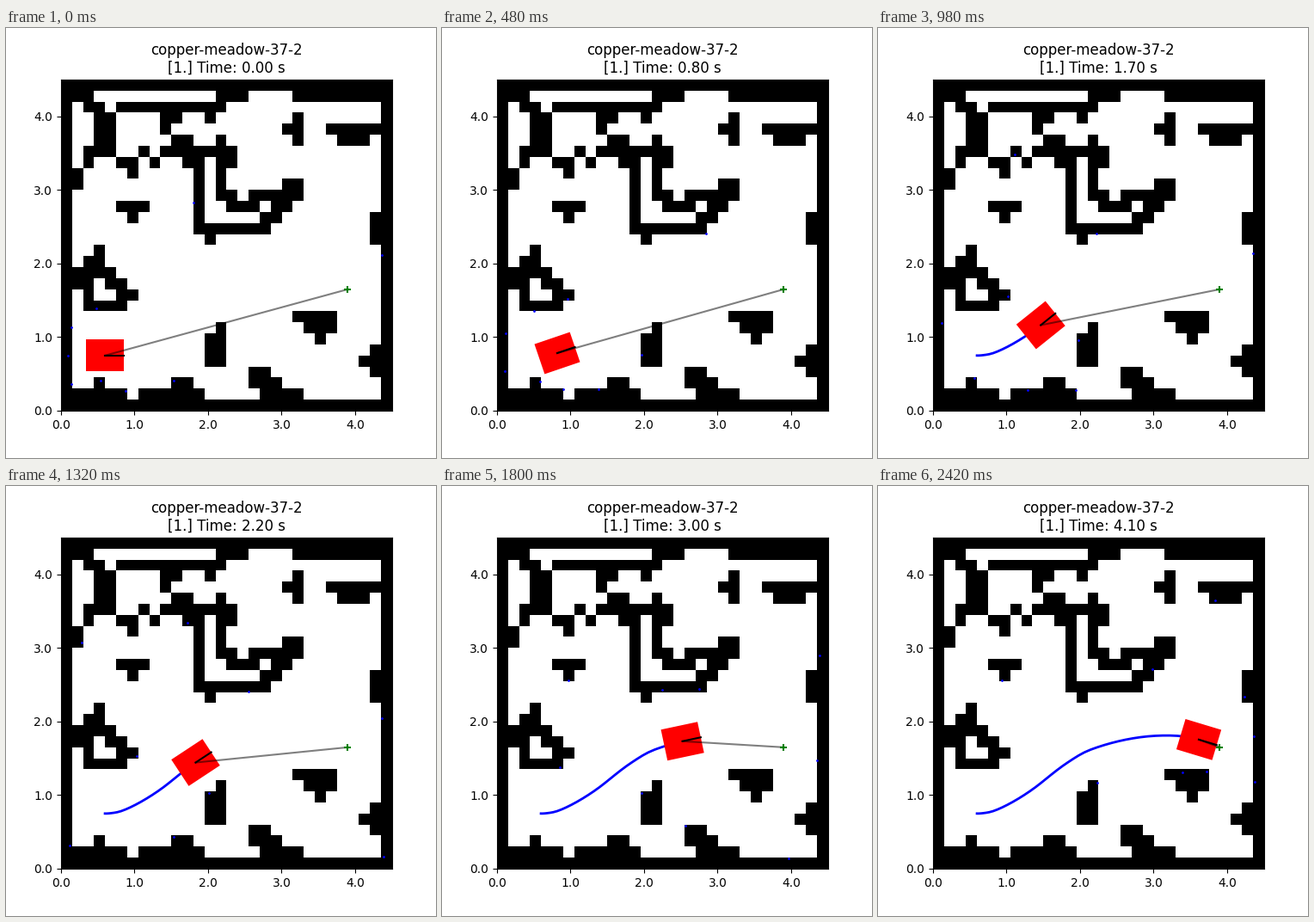
Animation of 500 by 500 pixels, one loop 2.44 s. Source, as a matplotlib script:

```python
import numpy as np
import matplotlib.pyplot as plt
from matplotlib.animation import FuncAnimation
from matplotlib.patches import Polygon

CELLS, CELL = 30, 0.15
SIZE = CELLS * CELL
LENGTH, WIDTH = 0.508, 0.430
GOAL = np.array([3.9, 1.65])
DT, STEPS = 0.1, 42
BEAMS = np.radians(np.arange(-180, 180, 40))
RAY_STEP = 0.05

# Walls: first cell (column, row from the top), then a walk over the cells.
WALLS = [
    (1, 1, "R1 D1 R1 D4 L1 D1"), (4, 3, "D3"), (16, 1, "L2 D1 L9"),
    (13, 3, ""), (10, 3, "L1 D1"), (21, 1, "R8"), (20, 4, "R1 U1 D2"),
    (24, 4, "R4 L1 D1 L2"),
    (10, 5, "R1 D2 R1 D6 R6 U1 R1 U1 R1 U2 R1 D1 L4 D1 L2 U1 L1 U5"),
    (9, 6, "R6 D1"), (13, 14, ""), (7, 6, ""), (8, 7, ""), (5, 7, "R1 D1"),
    (1, 8, "D1"), (5, 11, "R2 L1 D1"), (28, 12, "D2"),
    (3, 15, "D2 R1 D1 R1 D1 R1 L1 D1 L3 U4"), (1, 17, "D1"),
    (21, 21, "R3 D1 L2 R1 D1"), (14, 22, "D3 L1 U2"),
    (28, 24, "D1 L1 R1 D1"), (18, 26, "L1 D1 R2 D1 R2 L3"),
    (3, 27, ""), (1, 28, "R4"), (10, 27, "R1"), (7, 28, "R5"),
]
MOVES = {"R": (1, 0), "L": (-1, 0), "D": (0, 1), "U": (0, -1)}

# time, x, y, heading (deg), speed, turn rate (deg/s)
KEYS = np.array([
    (0.0, 0.600, 0.750, 0.0, 0.00, 0),
    (0.5, 0.683, 0.755, 7.0, 0.34, 28),
    (0.8, 0.821, 0.783, 18.8, 0.58, 38),
    (1.7, 1.467, 1.163, 38.7, 0.90, 2),
    (2.2, 1.832, 1.443, 33.4, 0.92, -26),
    (2.6, 2.147, 1.619, 20.4, 0.95, -28),
    (3.5, 3.022, 1.806, 3.1, 1.00, -23),
    (4.1, 3.615, 1.755, -16.8, 0.98, -38),
])


def build_grid():
    grid = np.zeros((CELLS, CELLS), bool)
    grid[[0, -1], :] = True
    grid[:, [0, -1]] = True
    for col, row, walk in WALLS:
        grid[row, col] = True
        for move in walk.split():
            dx, dy = MOVES[move[0]]
            for _ in range(int(move[1:])):
                col, row = col + dx, row + dy
                grid[row, col] = True
    return grid


def hermite(t, times, values, slopes):
    i = np.clip(np.searchsorted(times, t, side="right") - 1, 0, len(times) - 2)
    h = times[i + 1] - times[i]
    u = (t - times[i]) / h
    return ((1 + 2 * u) * (1 - u) ** 2 * values[i]
            + u * (1 - u) ** 2 * h * slopes[i]
            + u * u * (3 - 2 * u) * values[i + 1]
            + u * u * (u - 1) * h * slopes[i + 1])


def build_poses():
    times, x, y, heading, speed, turn = KEYS.T
    angle = np.radians(heading)
    t = np.arange(STEPS) * DT
    return np.column_stack([
        hermite(t, times, x, speed * np.cos(angle)),
        hermite(t, times, y, speed * np.sin(angle)),
        hermite(t, times, angle, np.radians(turn)),
    ])


def cast_ray(start, angle):
    """March in fixed steps until the point lies inside a wall."""
    step = RAY_STEP * np.array([np.cos(angle), np.sin(angle)])
    for n in range(1, 130):
        point = start + n * step
        col, row = (np.floor(point / CELL + 1e-6)).astype(int)
        col = min(max(col, 0), CELLS - 1)
        row = min(max(row, 0), CELLS - 1)
        if grid[CELLS - 1 - row, col]:
            break
    return point


def robot_corners(x, y, angle):
    c, s = np.cos(angle), np.sin(angle)
    box = np.array([(-1, -1), (1, -1), (1, 1), (-1, 1)])
    box = box * (LENGTH / 2, WIDTH / 2)
    return box @ np.array([(c, s), (-s, c)]) + (x, y)


grid = build_grid()
poses = build_poses()
scans = [np.array([cast_ray(p[:2], p[2] + b) for b in BEAMS]) for p in poses]

fig, ax = plt.subplots(figsize=(5, 5), dpi=100)
ax.imshow(grid, cmap="gray_r", extent=(0, SIZE, 0, SIZE),
          interpolation="nearest", zorder=0)
ticks = range(5)
labels = [f"{v:.1f}" for v in ticks]
ax.set_xticks(ticks, labels)
ax.set_yticks(ticks, labels)
ax.set(xlim=(0, SIZE), ylim=(0, SIZE))

trail, = ax.plot([], [], color="blue", lw=2, zorder=2)
robot = Polygon(robot_corners(*poses[0]), fc="red", ec="none", zorder=3)
ax.add_patch(robot)
goal_line, = ax.plot([], [], color="black", alpha=0.5, lw=1.5, zorder=4)
nose, = ax.plot([], [], color="black", lw=1.5, zorder=5)
hits, = ax.plot([], [], ".", color="blue", ms=2, zorder=6)
ax.plot(*GOAL, "+", color="green", ms=6, mew=1.5, zorder=7)
title = ax.set_title("")


def update(tick):
    # Steps last 20 ms and 100 ms in turn.
    k = 2 * (tick // 6) + (tick % 6 > 0)
    x, y, angle = poses[k]
    trail.set_data(poses[:k + 1, 0], poses[:k + 1, 1])
    robot.set_xy(robot_corners(x, y, angle))
    goal_line.set_data([x, GOAL[0]], [y, GOAL[1]])
    reach = LENGTH / 2
    nose.set_data([x, x + reach * np.cos(angle)],
                  [y, y + reach * np.sin(angle)])
    hits.set_data(scans[k][:, 0], scans[k][:, 1])
    title.set_text(f"copper-meadow-37-2\n[1.] Time: {k * DT:.2f} s")
    return trail, robot, goal_line, nose, hits, title


anim = FuncAnimation(fig, update, frames=122, interval=20, repeat=True,
                     repeat_delay=0, blit=False)
plt.show()
```
